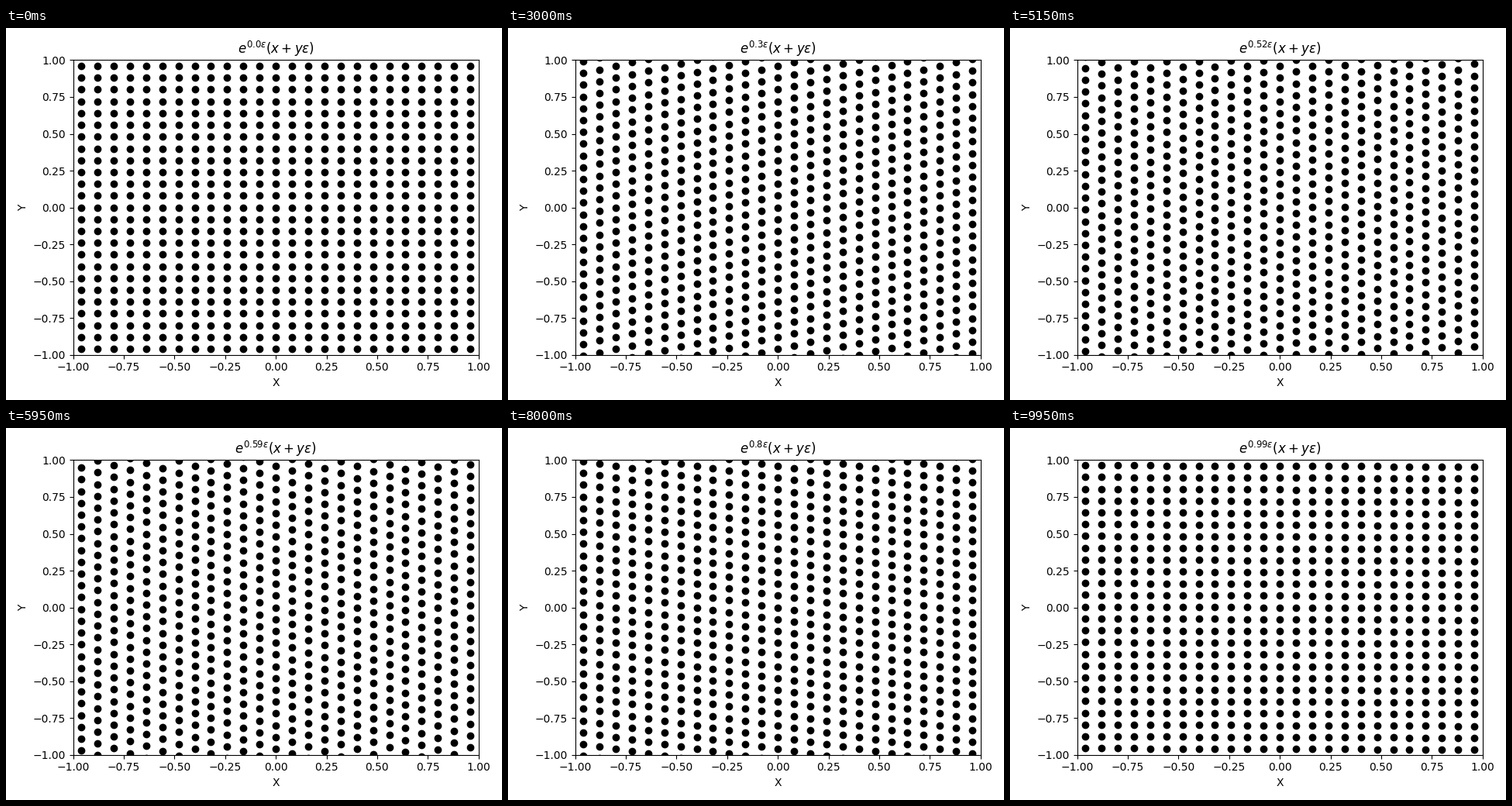
Recreate the animation shown at these times as a matplotlib script. Size 640 px wide and 480 px high, loop 10000 ms.

```python
import numpy as np
import matplotlib.pyplot as plt
from matplotlib.animation import FuncAnimation

FRAMES = 200
INTERVAL = 50


def title_text(t):
    return rf"$e^{{{round(t, 2)}\epsilon}}(x+y\epsilon)$"


# The grid is taller than the view so the shear never uncovers a gap.
x, y = np.meshgrid(np.linspace(-0.96, 0.96, 25), np.linspace(-2, 2, 51))
x, y = x.ravel(), y.ravel()

fig, ax = plt.subplots(figsize=(6.4, 4.8), dpi=100)
dots, = ax.plot(x, y, "ko")
ax.set_xlim(-1, 1)
ax.set_ylim(-1, 1)
ax.set_xlabel("X")
ax.set_ylabel("Y")
title = ax.set_title(title_text(0.0))
fig.tight_layout()


def update(i):
    """Multiply every dual number x + y*eps by e^(t*eps): a vertical shear."""
    t = i / FRAMES
    dots.set_ydata(y + t * x)
    title.set_text(title_text(t))
    return dots, title


anim = FuncAnimation(fig, update, frames=FRAMES, interval=INTERVAL,
                     repeat=True, repeat_delay=0, blit=False)
plt.show()
```
